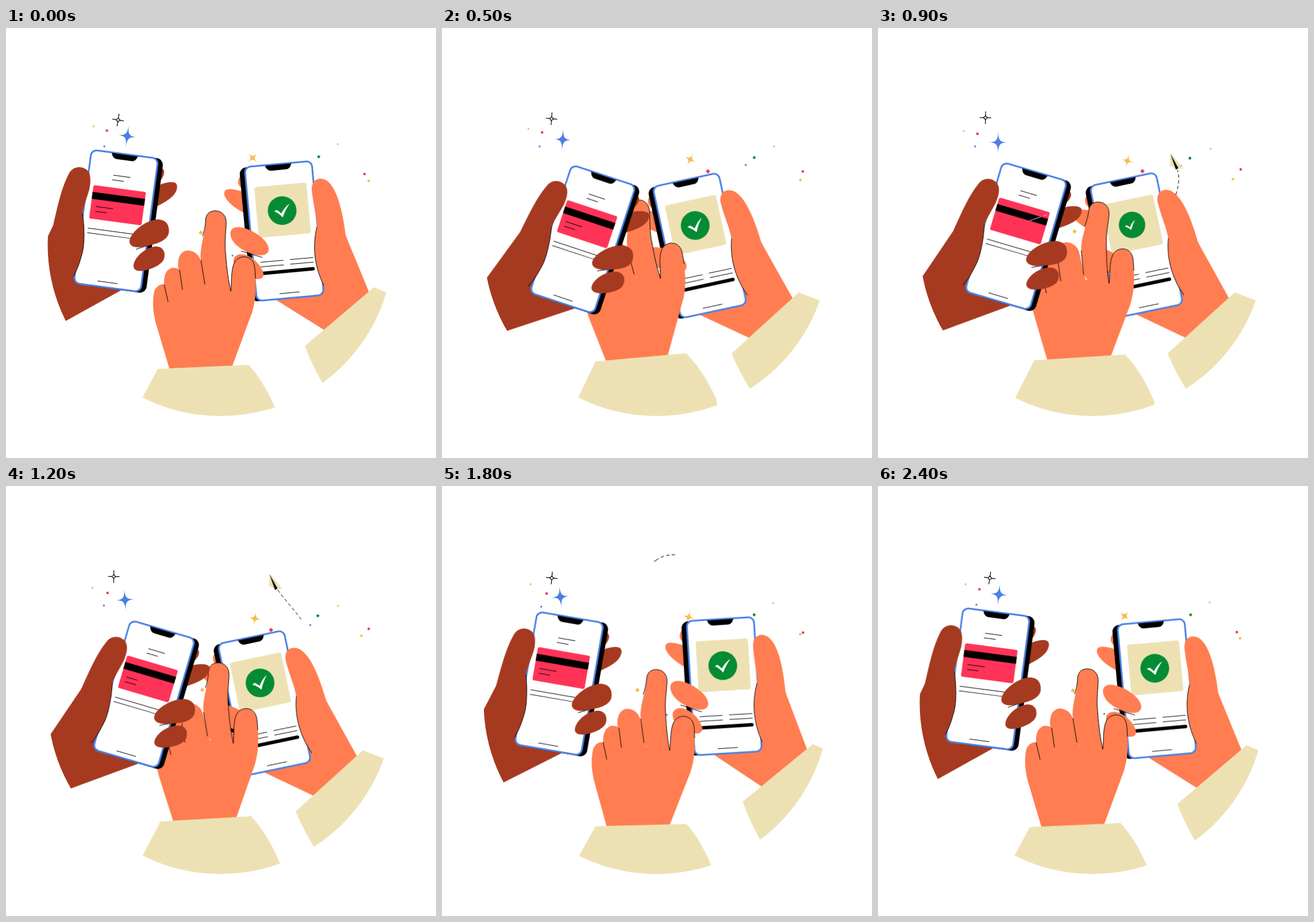
Animation of 748x748 px, one loop 2500 ms. Source, as an HTML page without scripts:

```html
<!DOCTYPE html>
<html lang="en">
<head>
<meta charset="utf-8">
<title>Phone payment</title>
<style>
html, body { margin: 0; width: 100%; height: 100%; overflow: hidden; background: #fff; }
svg { display: block; width: 100vw; height: 100vh; }
:root {
  --brown: #a63a20; --skin: #ff7d50; --cream: #ede1b4; --blue: #4a80e4;
  --red: #ff3358; --green: #058b33; --gold: #f6bd55;
  /* stepped easings, one step per 100 ms */
  --swing: linear(0 0% 33.3%, .22 33.3% 66.6%, .72 66.6% 100%, 1 100%);
  --start: linear(0 0% 33.3%, .16 33.3% 66.6%, .52 66.6% 100%, 1 100%);
  --stop: linear(0 0% 33.3%, .45 33.3% 66.6%, .8 66.6% 100%, 1 100%);
  --settle: linear(0 0% 16.6%, .42 16.6% 33.3%, .68 33.3% 49.9%, .84 49.9% 66.6%, .93 66.6% 83.3%, .98 83.3% 100%, 1 100%);
}
.line { fill: none; stroke: #000; stroke-width: 1; }
.brown { fill: var(--brown); }
.skin { fill: var(--skin); }
.cream { fill: var(--cream); }
.move { animation: 2.5s step-end infinite; }

.left { transform-origin: 147.5px 210px; animation-name: left; }
.right { transform-origin: 480.5px 317.5px; animation-name: right; }
.cuff { transform-origin: 640px 451px; animation-name: cuff; }
.point { transform-origin: 391px 458px; animation-name: point; }
.index { transform-origin: 387px 454px; animation-name: index; }
.wrist { transform-origin: 264px 593px; animation-name: wrist; }
.thumb { animation-name: lean; }

@keyframes left {
  0%, 100% { transform: translate(0, 0) rotate(0deg); animation-timing-function: var(--swing); }
  12% { transform: translate(71.9px, 23px) rotate(10deg); animation-timing-function: steps(2); }
  20% { transform: translate(77.6px, 26.1px) rotate(10.7deg); animation-timing-function: steps(4); }
  36% { transform: translate(68.5px, 21.5px) rotate(8.8deg); }
  60% { transform: translate(68.5px, 21.5px) rotate(8.8deg); animation-timing-function: var(--start); }
  72% { transform: translate(17.3px, 6.7px) rotate(2.2deg); animation-timing-function: var(--settle); }
  96% { transform: translate(-.5px, .2px) rotate(-.1deg); }
}
@keyframes right {
  0%, 100% { transform: translate(0, 0) rotate(0deg); animation-timing-function: var(--swing); }
  12% { transform: translate(-47.5px, 32.5px) rotate(-7.6deg); animation-timing-function: steps(2); }
  20% { transform: translate(-40px, 26px) rotate(-7deg); animation-timing-function: steps(2); }
  28%, 36% { transform: translate(-38.5px, 25px) rotate(-6.6deg); }
  48% { transform: translate(-38.5px, 25px) rotate(-6.6deg); animation-timing-function: var(--start); }
  60% { transform: translate(-13px, 8px) rotate(-3.1deg); animation-timing-function: var(--stop); }
  72% { transform: translate(8px, -5px) rotate(1.7deg); animation-timing-function: var(--settle); }
  96% { transform: translate(1px, -.5px) rotate(.1deg); }
}
@keyframes cuff {
  0%, 100% { transform: translate(0, 0) rotate(0deg); animation-timing-function: var(--swing); }
  12% { transform: translate(-23px, 11px) rotate(-2.6deg); animation-timing-function: steps(2); }
  20%, 36% { transform: translate(-19.5px, 9px) rotate(-1.9deg); }
  48% { transform: translate(-19.5px, 9px) rotate(-1.9deg); animation-timing-function: var(--start); }
  60% { transform: translate(-1px, 0) rotate(0deg); animation-timing-function: var(--stop); }
  72% { transform: translate(5px, -2px) rotate(1deg); animation-timing-function: var(--settle); }
  96% { transform: translate(1px, 0) rotate(0deg); }
}
@keyframes point {
  0%, 100% { transform: translate(0, 0) rotate(0deg); animation-timing-function: var(--swing); }
  12% { transform: translate(-8px, -21px) rotate(-4.8deg); animation-timing-function: steps(2); }
  20% { transform: translate(-11px, -22px) rotate(-5deg); animation-timing-function: steps(4); }
  36% { transform: translate(11px, -14px) rotate(.3deg); animation-timing-function: steps(6); }
  60% { transform: translate(-2px, -7px) rotate(-2.4deg); animation-timing-function: var(--stop); }
  72% { transform: translate(5px, 2px) rotate(1.2deg); animation-timing-function: var(--settle); }
  96% { transform: translate(0, 0) rotate(0deg); }
}
@keyframes index {
  0%, 100% { transform: rotate(0deg); animation-timing-function: var(--swing); }
  12% { transform: rotate(-1.4deg); animation-timing-function: steps(2); }
  20% { transform: rotate(-.4deg); animation-timing-function: steps(4); }
  36% { transform: rotate(3.6deg); animation-timing-function: steps(6); }
  60% { transform: rotate(-1deg); animation-timing-function: var(--stop); }
  72% { transform: rotate(.5deg); animation-timing-function: var(--settle); }
  96% { transform: rotate(0deg); }
}
@keyframes wrist {
  0%, 100% { transform: translate(0, 0) rotate(0deg); animation-timing-function: var(--swing); }
  12% { transform: translate(3px, -12px) rotate(-2.4deg); animation-timing-function: steps(2); }
  20% { transform: translate(3px, -13px) rotate(-2.6deg); animation-timing-function: steps(4); }
  36% { transform: translate(8px, -15px) rotate(-1.1deg); animation-timing-function: steps(6); }
  60% { transform: translate(1px, -4px) rotate(-.4deg); animation-timing-function: var(--stop); }
  72% { transform: translate(3px, -1px) rotate(1deg); animation-timing-function: var(--settle); }
  96% { transform: translate(0, .3px) rotate(0deg); }
}
@keyframes lean {
  0%, 100% { transform: rotate(0deg); animation-timing-function: var(--swing); }
  12% { transform: rotate(var(--tilt)); }
  60% { transform: rotate(var(--tilt)); animation-timing-function: var(--stop); }
  72%, 96% { transform: rotate(0deg); }
}

/* sparkles wander through four spots */
.drift { animation-name: drift; }
@keyframes drift {
  0%, 100% { translate: var(--a); rotate: var(--ra, 12deg); animation-timing-function: steps(9); }
  36% { translate: var(--b); rotate: var(--rb, 12deg); animation-timing-function: steps(6); }
  60% { translate: var(--c); rotate: var(--rc, 12deg); animation-timing-function: steps(3); }
  72% { translate: var(--d); rotate: var(--rd, 12deg); animation-timing-function: steps(7); }
}

.pop { animation-name: pop; }
.tick { transform-origin: -14px 0; animation-name: tick; }
.note { stroke-dasharray: 30 60; animation-name: note; }
.shine { animation-name: shine; }
@keyframes pop {
  0%, 28%, 40%, 100% { transform: scale(1); }
  32% { transform: scale(.85); }
  36% { transform: scale(.92); }
}
@keyframes tick {
  0%, 28%, 44%, 100% { transform: scale(1); }
  32% { transform: scale(.55); }
  36% { transform: scale(.76); }
  40% { transform: scale(.9); }
}
@keyframes note {
  0% { stroke-dashoffset: 0; }
  24% { stroke-dashoffset: 0; animation-timing-function: steps(3); }
  36% { stroke-dashoffset: -29px; }
  40% { stroke-dashoffset: 30px; animation-timing-function: steps(3); }
  52%, 100% { stroke-dashoffset: 0; }
}
@keyframes shine {
  0%, 40%, 100% { opacity: 0; transform: translate(0, 0); }
  32% { opacity: 1; transform: translate(-30px, 0); }
  36% { opacity: 1; transform: translate(0, 0); }
}

.plane {
  offset-path: path("M518 290C527 265 524 245 512 230C495 208 483 195 475 184C455 155 440 125 408 120C390 118 378 124 366 134");
  animation-name: fly;
}
.trail { stroke-dashoffset: 0; animation-name: trail; }
@keyframes fly {
  0% { offset-distance: 0px; transform: scale(0); }
  28% { offset-distance: 0px; transform: scale(0); animation-timing-function: steps(2); }
  36% { offset-distance: 58px; transform: scale(1); animation-timing-function: steps(6); }
  60% { offset-distance: 223px; transform: scale(1); animation-timing-function: steps(3); }
  72% { offset-distance: 258px; transform: scale(.2); }
  76%, 100% { offset-distance: 262px; transform: scale(0); }
}
@keyframes trail {
  0% { stroke-dasharray: 0 600; stroke-dashoffset: 0; }
  28% { stroke-dasharray: 0 600; stroke-dashoffset: 0; animation-timing-function: steps(2); }
  36% { stroke-dasharray: 44 600; stroke-dashoffset: 0; animation-timing-function: steps(6); }
  60% { stroke-dasharray: 92 600; stroke-dashoffset: -121px; animation-timing-function: steps(3); }
  72% { stroke-dasharray: 40 600; stroke-dashoffset: -220px; }
  76%, 100% { stroke-dasharray: 0 600; stroke-dashoffset: -262px; }
}
</style>
</head>
<body>
<svg viewBox="0 0 748 748">
  <defs>
    <clipPath id="disc"><ellipse cx="373" cy="377" rx="300.5" ry="298"/></clipPath>
    <rect id="dot" x="-.5" y="-.5" width="1" height="1"/>
    <path id="star" d="M0 -19C.5 -4 3 -.5 16 0C3 .5 .5 4 0 19C-.5 4 -3 .5 -16 0C-3 -.5 -.5 -4 0 -19"/>
    <g id="screen">
      <rect x="1.5" y="1.5" width="117" height="234" rx="10" fill="#fff" stroke="var(--blue)" stroke-width="3"/>
      <path d="M37 2.5H83Q80 12 73 12H47Q40 12 37 2.5"/>
      <path class="line" d="M42 226.5H77"/>
    </g>
    <path id="way" d="M518 290C527 265 524 245 512 230C495 208 483 195 475 184C455 155 440 125 408 120C390 118 378 124 366 134"/>
    <mask id="window" maskUnits="userSpaceOnUse" x="0" y="0" width="748" height="748">
      <use href="#way" class="move trail" fill="none" stroke="#fff" stroke-width="6"/>
    </mask>
  </defs>

  <g id="sparkles">
    <path class="move drift" style="--a:195px 160px;--b:187px 156px;--c:188px 159px;--d:191px 160px;--ra:9deg;--rb:1deg;--rc:0deg;--rd:5deg"
      d="M0 -11V-4M0 4V11M-10 0H-4M4 0H10M0 -4Q1 -1 4 0Q1 1 0 4Q-1 1 -4 0Q-1 -1 0 -4" fill="#fff" stroke="#000" stroke-width="1.2"/>
    <g class="move drift" style="--a:211px 188px;--b:209px 199px;--c:205px 197px;--d:206px 193px;--ra:8deg;--rb:0deg;--rc:-8deg;--rd:-6deg">
      <use href="#star" fill="var(--blue)"/></g>
    <g class="move drift" style="--a:429px 226px;--b:434px 231px;--c:432px 230px;--d:429px 228px;--ra:45deg;--rb:15deg;--rc:5deg;--rd:15deg">
      <use href="#star" transform="scale(.75 .64)" fill="var(--gold)"/></g>
    <g fill="var(--gold)">
      <g class="move drift" style="--a:152px 171px;--b:149px 179px;--c:152px 175px;--d:154px 171px"><use href="#dot" transform="scale(3)"/></g>
      <g class="move drift" style="--a:577px 202px;--b:578.5px 210px;--c:576.5px 207px;--d:576px 204px"><use href="#dot" transform="scale(3)"/></g>
      <g class="move drift" style="--a:631px 266px;--b:617.5px 263px;--c:619px 258px;--d:623px 258px"><use href="#dot" transform="scale(4)"/></g>
      <g class="move drift" style="--a:339px 356px;--b:342px 354px;--c:341px 355px;--d:340px 355px;--ra:30deg;--rb:30deg;--rc:30deg;--rd:30deg"><use href="#dot" transform="scale(5.5)"/></g>
    </g>
    <g fill="#e83e5e">
      <g class="move drift" style="--a:175.5px 178.5px;--b:173px 184px;--c:180.5px 188px;--d:182px 187px;--ra:0deg;--rb:0deg;--rc:0deg;--rd:0deg"><use href="#dot" transform="scale(4)"/></g>
      <g class="move drift" style="--a:623.5px 254px;--b:631px 246px;--c:631px 251px;--d:628px 255px;--ra:0deg;--rb:0deg;--rc:0deg;--rd:0deg"><use href="#dot" transform="scale(4)"/></g>
      <g class="move drift" style="--a:466px 250px;--b:460px 249px;--c:462px 252px;--d:465px 252px;--ra:35deg;--rb:35deg;--rc:35deg;--rd:35deg"><use href="#dot" transform="scale(5.5)"/></g>
    </g>
    <g class="move drift" style="--a:544px 224px;--b:542.5px 226.5px;--c:542.5px 225px;--d:543px 224px;--ra:35deg;--rb:35deg;--rc:35deg;--rd:35deg"><use href="#dot" transform="scale(4.2)" fill="var(--green)"/></g>
    <g fill="var(--blue)">
      <g class="move drift" style="--a:171px 206px;--b:169px 206px;--c:171.5px 210px;--d:172.5px 210px"><use href="#dot" transform="scale(3)"/></g>
      <g class="move drift" style="--a:530px 236px;--b:527px 240px;--c:531.5px 244px;--d:532px 242px"><use href="#dot" transform="scale(3)"/></g>
      <g class="move drift" style="--a:394px 396px;--b:392px 400px;--c:391px 400px;--d:391px 398px"><use href="#dot" transform="scale(2.8)"/></g>
    </g>
  </g>

  <g clip-path="url(#disc)">
    <g class="move right">
      <g class="skin">
        <path d="M414 253Q402 260 404 270Q406 278 416 282Z"/>
        <path d="M424 290C405 281 390 278 382 282C376 288 382 298 392 307C400 314 410 320 424 326Z"/>
        <path d="M591 361L640 480L575 539L553 525L465 470L530 330Z"/>
      </g>
      <g transform="translate(413.5 240.5) rotate(-5.2)">
        <rect x="-8" y="2" width="100" height="234" rx="12"/>
        <use href="#screen"/>
        <rect class="cream" x="15" y="38" width="91" height="88.5" rx="4"/>
        <g transform="translate(59.7 82.8)">
          <g class="move pop">
            <circle r="25" fill="var(--green)"/>
            <path class="move tick" d="M-14 0L-9 -2Q-5 1 -2 5Q5 -6 14 -11Q5 0 0 12Q-6 4 -14 0" fill="#fff"/>
          </g>
        </g>
        <path class="line" d="M14 169H54M65.5 169H106M14 177H54M65.5 177H106"/>
        <path class="line" d="M14 188.5H104" style="stroke-width:6;stroke-linecap:round"/>
      </g>
      <g class="skin">
        <path d="M391 362C388 350 397 344 410 347C430 351 455 368 457 383C458 394 448 396 438 395C422 393 395 380 391 362"/>
        <path d="M396 408C394 398 402 392 414 394C432 398 447 417 448 428C448 437 440 438 430 436C416 432 398 422 396 408"/>
      </g>
      <path class="line" d="M409 388L446 399"/>
      <g class="move thumb" style="--tilt:-2deg;transform-origin:591px 361px">
        <path class="skin" d="M591 361C586 320 575 270 553 263C541 259 531 267 532 282C534 305 541 330 541 346C536 365 536 385 538 400C541 420 546 434 553 448L575 470L604 420Z"/>
        <path class="line" d="M541 346C536 365 536 385 538 400C541 420 546 434 553 448"/>
      </g>
    </g>
    <path class="move cuff cream" d="M640 451L520 553Q530 583 560 634L710 600V480Z"/>

    <g class="move point">
      <path class="skin" d="M290 615L284 592L262 518C255 493 255 478 257 463C258 452 266 445 275 446C274 430 279 419 290 417C294 417 298 418 300 419C297 400 304 388 316 387C328 387 337 396 339 406L350 452L391 458C393 440 391 422 397 409C401 401 408 398 415 398C426 399 432 406 433 420C435 450 436 468 428 495L394 587L385 612Z"/>
      <g class="move index">
        <path class="skin" d="M346 446L339 404C336 385 346 360 347 337C347 324 354 318 364 318C376 318 384 327 383 341C382 360 380 375 382 392C384 420 387 440 391 458L370 475Z"/>
        <path class="line" d="M339 404L346 446M342 362C346 350 347 340 347 337C347 324 354 318 364 318C376 318 384 327 383 341C382 360 380 375 382 392C384 420 387 440 391 458"/>
      </g>
      <path class="line" d="M275 446L282 476M302 421L307 455M391 458C393 440 391 422 397 409C401 401 408 398 415 398C426 399 432 406 433 420L434 436"/>
    </g>
    <path class="move wrist cream" d="M264 593L422 586Q450 616 471 668L474 700H225V666Z"/>

    <g class="move left">
      <g class="brown">
        <path d="M266 240Q276 245 275 252Q274 260 266 268Z"/>
        <path d="M256 279C270 270 285 266 294 269C300 272 298 283 292 290C284 299 274 304 256 314Z"/>
        <path d="M82 343L30 453V551L105 509L206 453L170 330Z"/>
      </g>
      <g transform="translate(147.5 210) rotate(7.6)">
        <rect x="20" y="1" width="108" height="236" rx="12"/>
        <use href="#screen"/>
        <path class="line" d="M45 40.5H75M44 48.7H64.5M13 137.5H94M13 145.5H90"/>
        <rect x="13" y="62" width="92" height="58.5" rx="3" fill="var(--red)"/>
        <path d="M13 74H105V86H13Z"/>
        <path class="line move note" d="M22 98.5H52"/>
        <path class="line move note" d="M22 107H42"/>
        <path class="move shine" d="M75 86L92 74M96 71L101 67.5" fill="none" stroke="#fff"/>
      </g>
      <path class="line" d="M226 385L262 373"/>
      <g class="brown">
        <path d="M215 369C218 355 240 336 262 333C280 332 285 345 283 357C280 370 262 376 240 380C225 384 213 380 215 369"/>
        <path d="M222 411C225 398 240 383 259 380C273 379 278 390 275 401C271 413 250 420 240 422C228 424 220 421 222 411"/>
      </g>
      <g class="move thumb" style="--tilt:2.5deg;transform-origin:82px 343px">
        <path class="brown" d="M82 343C93 295 98 275 110 252C116 242 128 239 138 245C148 251 148 265 145 280C141 295 134 312 133 322C137 350 137 380 131 397C127 412 123 422 116 434L85 440Z"/>
        <path class="line" d="M133 322C137 350 137 380 131 397C127 412 123 422 117 432"/>
      </g>
    </g>
  </g>

  <g mask="url(#window)"><use href="#way" fill="none" stroke="#000" stroke-dasharray="6 4"/></g>
  <g class="move plane">
    <path class="cream" d="M17 4L-17 8L-12 -2L0 -9Z"/>
    <path d="M16 3L-12 1V-4Z"/>
  </g>
</svg>
</body>
</html>
```
